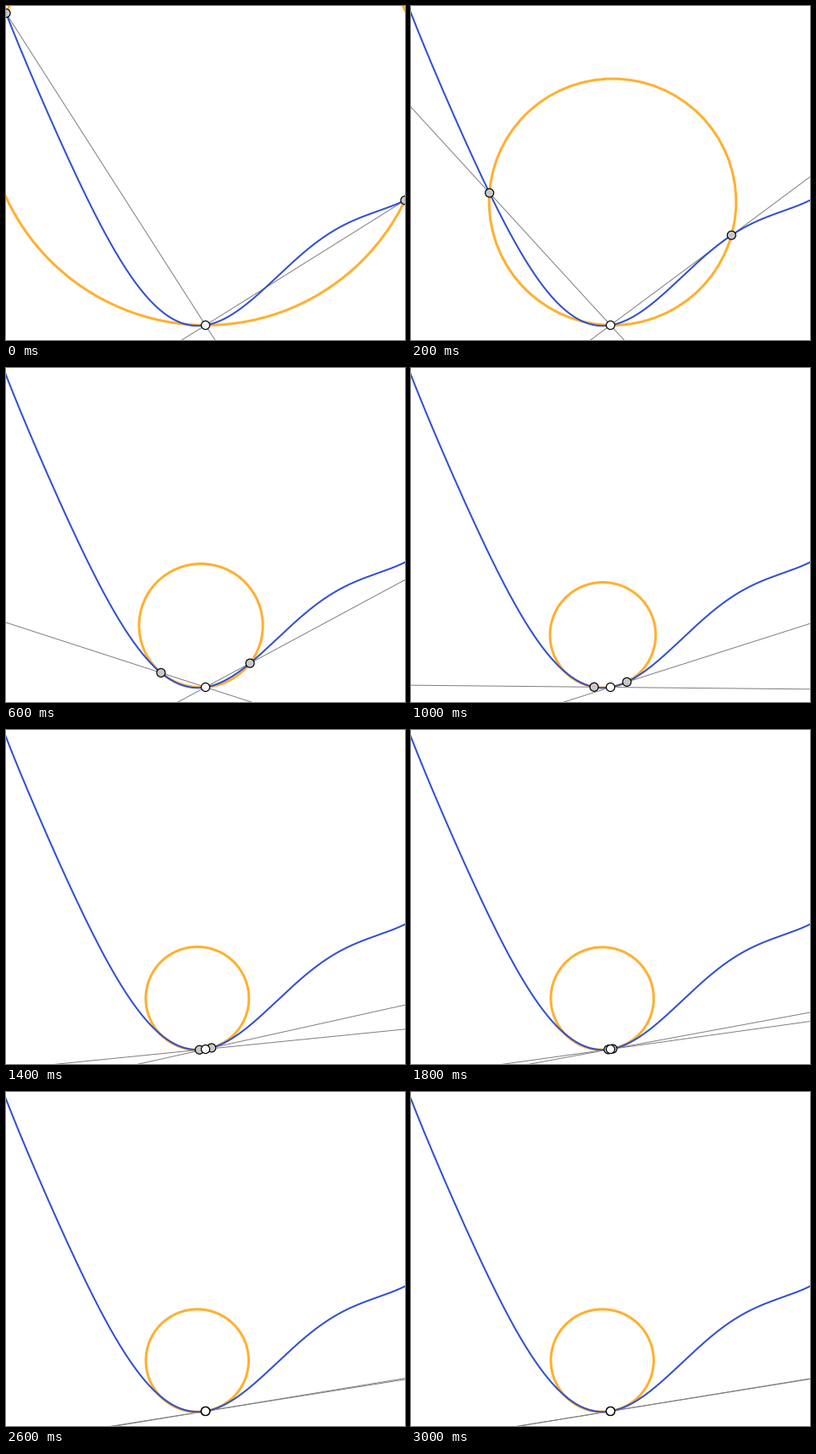
Animation, 471 px wide and 395 px high, one loop 4000 ms. Source, as a matplotlib script:

```python
import numpy as np
import matplotlib.pyplot as plt
from matplotlib.animation import FuncAnimation
from matplotlib.patches import Circle

WIDTH, HEIGHT, DPI = 471, 395, 64
FRAMES, INTERVAL, LAST_STEP = 40, 100, 30
HALF = WIDTH / 2
BASE_Y = 377.5
PX = 72 / DPI  # one pixel in points


def curve(x):
    """Smooth graph whose height is zero at the middle of the stage."""
    v = (x - HALF) / HALF
    t = v * v
    even = t * (475.16 + t * (-396.26 + t * (221.06 - 41.6 * t)))
    odd = v * (38.25 + t * (-269.02 + t * (157.88 - 37.75 * t)))
    return BASE_Y - even - odd


def circle_through(p, q, r):
    """Centre and radius of the circle through three points."""
    a, b = q - p, r - p
    a2, b2 = a @ a, b @ b
    d = 2 * (a[0] * b[1] - a[1] * b[0])
    offset = np.array([b[1] * a2 - a[1] * b2, a[0] * b2 - b[0] * a2]) / d
    return p + offset, np.hypot(*offset)


def point_at(x):
    return np.array([x, curve(x)])


fig = plt.figure(figsize=(WIDTH / DPI, HEIGHT / DPI), dpi=DPI, facecolor="white")
ax = fig.add_axes([0, 0, 1, 1])
ax.set(xlim=(0, WIDTH), ylim=(HEIGHT, 0))
ax.axis("off")

secants = [ax.plot([], [], color="#808080", lw=PX, zorder=1)[0] for _ in range(2)]
osculating = ax.add_patch(
    Circle((0, 0), 1, fill=False, ec="#ffb030", lw=3 * PX, zorder=2))
xs = np.linspace(-3, WIDTH + 3, 500)
ax.plot(xs, curve(xs), color="#3050d0", lw=2 * PX, zorder=3)


def add_node(fill, zorder):
    return ax.add_patch(
        Circle((0, 0), 5, fc=fill, ec="black", lw=1.2 * PX, zorder=zorder))


outer_nodes = [add_node("#c8c8c8", 4) for _ in range(2)]
middle = point_at(HALF)
add_node("white", 5).center = middle


def update(frame):
    h = HALF * np.exp(-min(frame, LAST_STEP) / 4)
    ends = [point_at(HALF - h), point_at(HALF + h)]
    for end, line, node in zip(ends, secants, outer_nodes):
        slope = (end[1] - middle[1]) / (end[0] - middle[0])
        x = np.array([-10, WIDTH + 10])
        line.set_data(x, middle[1] + slope * (x - HALF))
        node.center = end
    osculating.center, osculating.radius = circle_through(middle, *ends)
    return [*secants, osculating, *outer_nodes]


anim = FuncAnimation(fig, update, frames=FRAMES, interval=INTERVAL,
                     repeat=True, repeat_delay=0, blit=False)
plt.show()
```
